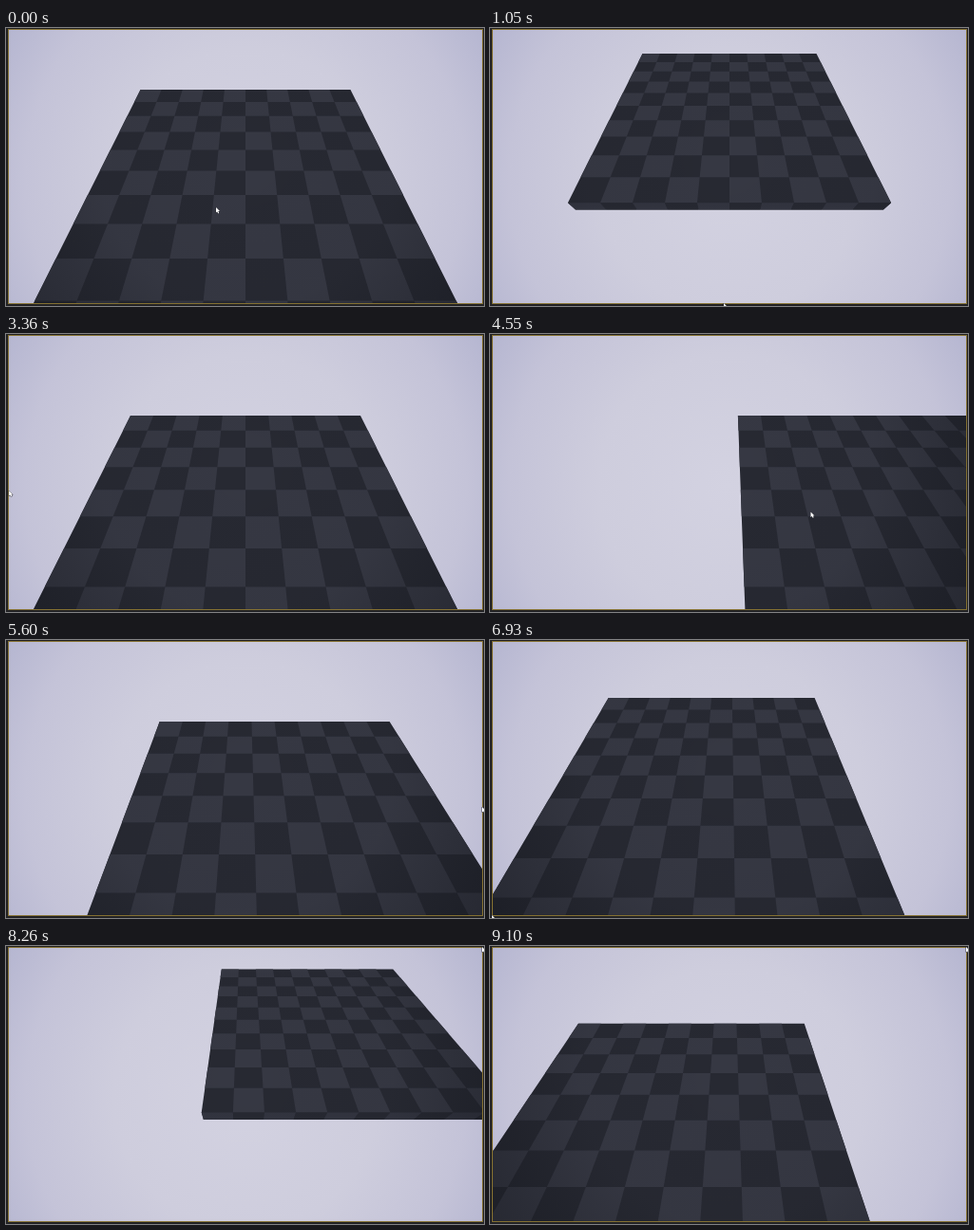
An HTML page with a canvas that plays this animation: 503x293 px, repeating every 9170 ms.

```html
<!DOCTYPE html>
<html lang="en">
<head>
<meta charset="utf-8">
<title>Edge-scrolling camera</title>
<style>
  html, body { margin: 0; width: 100%; height: 100%; overflow: hidden; background: #222225; }
  canvas { display: block; width: 100vw; height: 100vh; }
</style>
</head>
<body>
<canvas id="stage" width="503" height="293"></canvas>
<script>
const W = 503, H = 293, LOOP = 9170, STEP = 70;
const VIEW = { left: 2, top: 1, right: 501, bottom: 290 };
const CENTER_X = 252, HORIZON = -156, FOCAL = 3963.5;
const TILES = 10;
const SPEED = 6.3 / 1000; // tiles per ms
const START = { x: -5, depth: 17.935 }; // back left corner of the floor, in tiles
const ctx = document.getElementById('stage').getContext('2d');

// The pointer rests at each stop; while it touches an edge the camera scrolls.
const stops = [
  { x: 221, y: 189, arrive: 0, leave: 200 },
  { x: 246, y: 290, arrive: 460, leave: 1110 },
  { x: 252, y: 1, arrive: 1916, leave: 2813 },
  { x: 2, y: 190, arrive: 3400, leave: 4252 },
  { x: 501, y: 176, arrive: 4949, leave: 6239 },
  { x: 2, y: 290, arrive: 6630, leave: 7710 },
  { x: 460, y: 1, arrive: 8026, leave: 8150 },
  { x: 501, y: 1, arrive: 8190, leave: LOOP }
];

function pointerAt(t) {
  const i = stops.findIndex(stop => t <= stop.leave);
  const to = stops[i];
  if (t >= to.arrive) return to;
  const from = stops[i - 1];
  const p = (t - from.leave) / (to.arrive - from.leave);
  return {
    x: from.x + (to.x - from.x) * p * (2 - p),
    y: from.y + (to.y - from.y) * p * p
  };
}

function floorAt(t) {
  const floor = { ...START };
  for (const { x, y, arrive, leave } of stops) {
    const shift = SPEED * Math.max(0, Math.min(t, leave) - arrive);
    floor.x += shift * ((x <= VIEW.left) - (x >= VIEW.right));
    floor.depth += shift * ((y >= VIEW.bottom) - (y <= VIEW.top));
  }
  return floor;
}

function radial(x, y, r, stops) {
  const g = ctx.createRadialGradient(x, y, 0, x, y, r);
  stops.forEach(([at, color]) => g.addColorStop(at, color));
  return g;
}

const sky = radial(252, 160, 310, [
  [0, '#d3d2e1'], [.45, '#cecddd'], [.75, '#c4c3d8'], [1, '#b2b3cf']
]);
const vignette = radial(252, 140, 310, [
  [0, 'rgba(10,12,18,0)'], [.5, 'rgba(10,12,18,.04)'], [1, 'rgba(10,12,18,.38)']
]);

function polygon(points, fill) {
  ctx.beginPath();
  points.forEach(([x, y]) => ctx.lineTo(x, y));
  ctx.closePath();
  ctx.fillStyle = fill;
  ctx.fill();
}

function drawFloor({ x, depth }) {
  const scaleAt = row => FOCAL / (depth - row);
  const top = (col, row) => {
    const s = scaleAt(row);
    return [CENTER_X + (x + col) / TILES * s, HORIZON + s];
  };
  // The lower rim of the slab lies further from the camera.
  const under = col => {
    const s = scaleAt(TILES), rim = s / (1 + .000147 * s);
    return [CENTER_X + (x + col) / TILES * rim, HORIZON + rim * 1.0726];
  };
  const outline = [top(0, 0), top(TILES, 0), top(TILES, TILES), under(TILES), under(0), top(0, TILES)];

  polygon(outline, '#272932');
  for (let col = 0; col < TILES; col++) {
    for (let row = col % 2; row < TILES; row += 2) {
      polygon([top(col, row), top(col + 1, row), top(col + 1, row + 1), top(col, row + 1)], '#363843');
    }
    polygon([top(col, TILES), top(col + 1, TILES), under(col + 1), under(col)],
      col % 2 ? '#262831' : '#32343f');
  }
  polygon(outline, vignette);
}

function drawFrame() {
  const { left, top, right, bottom } = VIEW;
  ctx.fillStyle = '#222225';
  ctx.fillRect(0, 0, W, top);
  ctx.fillRect(0, 0, left, H);
  ctx.fillRect(right + 1, 0, W - right, H);
  ctx.fillRect(0, bottom + 1, W, H - bottom);
  ctx.lineWidth = 1;
  ctx.strokeStyle = '#857131';
  ctx.strokeRect(left + .5, top + .5, right - left, bottom - top);
}

function drawPointer({ x, y }) {
  ctx.save();
  ctx.translate(x, y);
  ctx.scale(.8, .8);
  ctx.lineWidth = 1;
  ctx.strokeStyle = '#24252c';
  ctx.fillStyle = '#fff';
  const arrow = new Path2D('M0 0V7L1.6 5.6 2.7 8 4 7.4 3 5.1H5Z');
  ctx.stroke(arrow);
  ctx.fill(arrow);
  ctx.restore();
}

function render(now) {
  const t = Math.floor(now % LOOP / STEP) * STEP;
  ctx.fillStyle = sky;
  ctx.fillRect(0, 0, W, H);
  drawFloor(floorAt(t));
  drawFrame();
  drawPointer(pointerAt(t));
}

const start = performance.now();
function tick() {
  render(performance.now() - start);
  requestAnimationFrame(tick);
}
tick();
</script>
</body>
</html>
```
